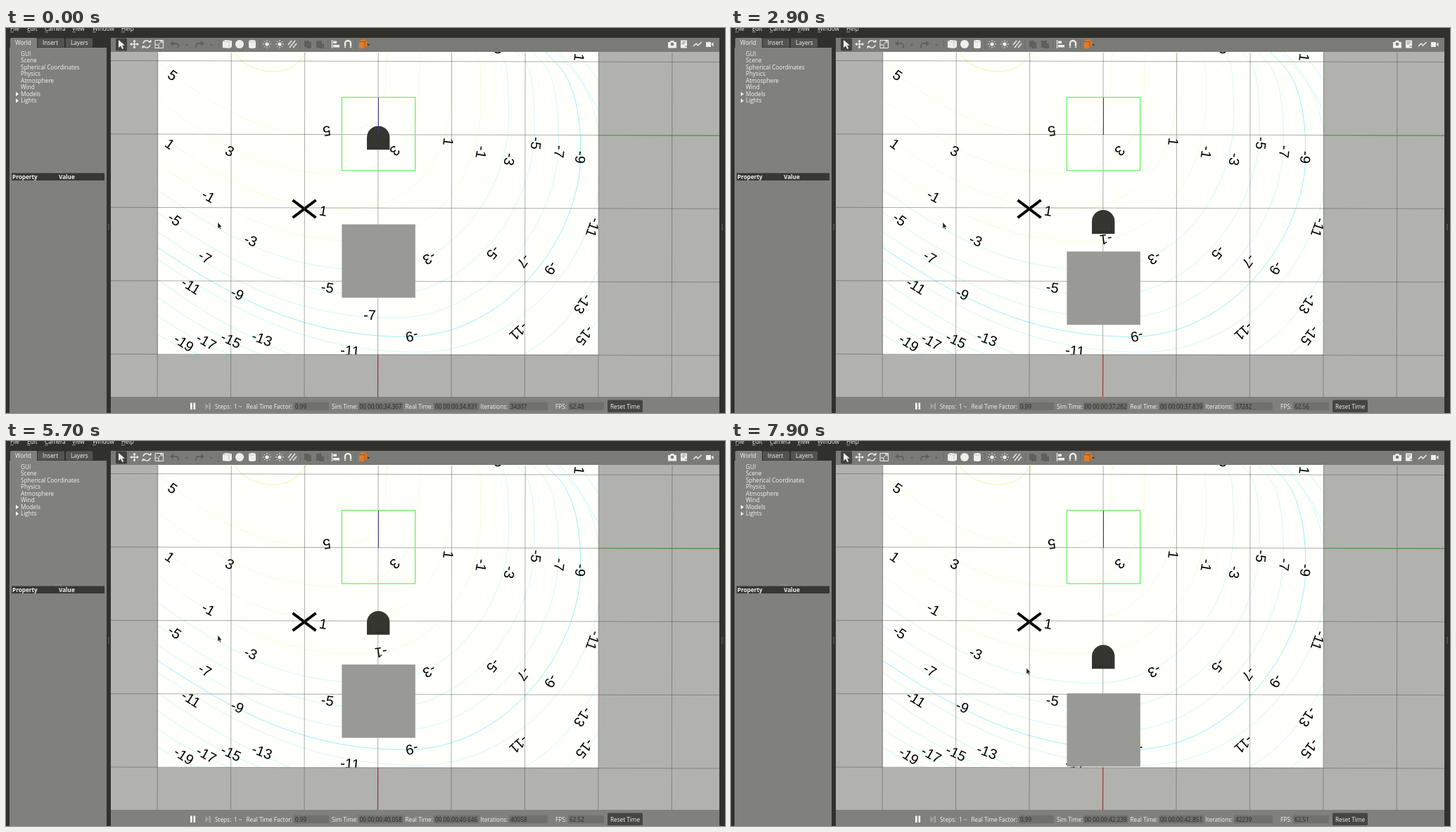
Recreate the animation shown at these times as an HTML page. Size 1022x548 px, loop 8 s.

```html
<!DOCTYPE html>
<html lang="en">
<head>
<meta charset="utf-8">
<title>Robot pushing a block</title>
<style>
html, body { margin: 0; width: 100%; height: 100%; overflow: hidden; background: #30302c; }
svg { display: block; width: 1022px; height: 548px; font: 8.2px "Open Sans", "Noto Sans", sans-serif; }
text { fill: #f2f2f0; white-space: pre; }
.label text { font: 20px "Liberation Sans", Arial, sans-serif; fill: #000; text-anchor: middle; }
.value { fill: #282825; }
</style>
</head>
<body>
<svg id="stage" viewBox="0 0 1022 548"></svg>
<script>
const rect = (x, y, w, h, fill, extra = '') =>
  `<rect x="${x}" y="${y}" width="${w}" height="${h}" fill="${fill}" ${extra}/>`;
const line = (d, stroke, width = 1, extra = '') =>
  `<path d="${d}" fill="none" stroke="${stroke}" stroke-width="${width}" ${extra}/>`;
const shape = (d, fill, extra = '') => `<path d="${d}" fill="${fill}" ${extra}/>`;
const text = (x, y, s, extra = '') => `<text x="${x}" y="${y}" ${extra}>${s}</text>`;
const each = (list, f) => list.map(f).join('');
const repeat = (n, f) => each([...Array(n).keys()], f);

const yellow = '#f4f09a', cyan = '#7ff0f4';

// Height line k: from the left edge through its lowest and rightmost points to the top.
function contour(k) {
  const left = 48 + 56 * k - 2.6 * k * k;
  const bx = 450 + 17 * k, by = 151 + 58 * k - 2.4 * k * k;
  const rx = 540 + 49 * k - 1.35 * k * k, ry = 60 + 17 * k;
  const top = rx - k * k, w = bx - 216;
  return line(`M216 ${left}C${216 + w * .32} ${left + (by - left) * .6} ${bx - w * .4} ${by} ${bx} ${by}` +
    `S${rx} ${ry + (by - ry) * .46} ${rx} ${ry}S${top + 8} 50 ${top} 34`,
    k < 4 ? yellow : cyan, 1, `opacity="${k === 7 ? .8 : .35}"`);
}
const cornerLine = d => line(d, cyan, 1, 'opacity=".4"');
const corners =
  repeat(4, i => cornerLine(`M216 ${358 + 26 * i}Q${300 - 18 * i} ${422 + 11 * i} ${405 - 43 * i} 465`)) +
  repeat(2, i => cornerLine(`M${735 + 60 * i} 465Q${800 + 20 * i} ${430 + 18 * i} 842 ${345 + 70 * i}`)) +
  repeat(2, i => cornerLine(`M${786 + 26 * i} 34Q${815 + 12 * i} ${62 - 10 * i} 842 ${118 - 44 * i}`));

// Labels follow the slope of the height lines; those on the right half stand on their heads.
const uprightLabels = `5 237 67|1 233 165|3 318 175|-1 288 239|-5 240 272|-3 348 302|-7 283 326|-11 263 367
|-9 329 378|-19 253 448|-17 285 446|-15 320 444|-13 364 442|-11 489 459|-7 517 408|-5 457 369|1 451 260`;
const turnedLabels = `5 456 147|3 553 175|1 629 162|-1 676 177|-3 716 187|-5 754 164|-7 787 176|-9 817 184
|1 815 42|-9 577 439|-3 602 328|-5 693 320|-7 736 332|-9 775 342|-11 835 284|-13 820 393|-15 823 438
|-11 729 432|-1 533 301`;
const uprightAngle = x => (530 - x) * .12;
const turnedAngle = (x, y) =>
  90 + Math.min(82, Math.max(7, Math.atan2(y - 145, 1.3 * (x - 530)) * 180 / Math.PI));
const labels = (list, angle) => each(list.split('|'), item => {
  const [s, x, y] = item.trim().split(' ');
  return `<text transform="translate(${x} ${y}) rotate(${angle(+x, +y)})" dy=".36em">${s}</text>`;
});

const gridLines = repeat(8, i => `M${215.8 + 104.45 * i} 35l-.7 490`) +
  repeat(5, i => `M149 ${46.5 + 104.4 * i}l865 2`);

const scene = `<g clip-path="url(#view)">
  ${rect(149, 34, 865, 491, '#b1b1ad')}
  ${rect(216, 34, 626, 430.7, '#fffffc')}
  <g clip-path="url(#plane)">
    ${repeat(9, contour)}
    ${corners}
    ${line('M325 34C332 49 355 62 380 62S418 49 426 34', yellow, 1, 'opacity=".9"')}
    <g class="label">${labels(uprightLabels, uprightAngle)}${labels(turnedLabels, turnedAngle)}</g>
    ${line('M695 34Q699 37 703 34', '#000', 1.6)}
    ${line('M407.5 245L440.5 270M440.5 245L407.5 270', '#000', 4)}
  </g>
  ${line(gridLines, '#4a4a46', 1, 'opacity=".45"')}
  ${line('M842 152.7L1014 153.2', '#45a345', 1.1)}
  ${line('M528.7 465L528.5 525', '#8e3b3b', 1.2)}
  <g id="robot">
    ${shape('M513 33.3V15.6A16.2 16.2 0 0 1 545.4 15.6V33.3Z', '#363631')}
    ${line('M517 17V30H541V17M524 29.5H535', '#2c2c28', .7)}
  </g>
  ${rect(477.4, 0, 104.4, 104.3, '#999995', 'id="block"')}
  ${line('M529.5 99V152', '#3c3c84')}
  ${rect(477.4, 98.6, 104.2, 104.4, 'none', 'stroke="#62ee62" stroke-width="1.2"')}
  <path id="cursor" d="M0 0V9L2 7.2L3.4 10.2L4.7 9.6L3.4 6.7H6Z" fill="#22221f" stroke="#eee" stroke-width=".5"/>
</g>`;

const menu = each([['File', 6], ['Edit', 30], ['Camera', 55], ['View', 94], ['Window', 123], ['Help', 164]],
  ([s, x]) => text(x, 4, s) + line(`M${x} 5.7h5`, '#ddd', .6));

const tree = ['GUI', 'Scene', 'Spherical Coordinates', 'Physics', 'Atmosphere', 'Wind', 'Models', 'Lights'];
const panel = rect(5, 28, 138, 520, '#80807d') +
  rect(6, 14, 38, 15, '#80807d', 'rx="1.5"') +
  repeat(2, i => rect(45 + 40 * i, 14.5, 38, 13, '#53534f', 'rx="1.5"')) +
  text(13, 24.3, 'World') + text(52, 24.3, 'Insert') + text(92, 24.3, 'Layers') +
  each(tree, (s, i) => text(21, 40 + i * 9.43, s)) +
  repeat(2, i => shape(`M14 ${91 + 9.4 * i}l4 3-4 3Z`, '#fff')) +
  line('M70 205H80', '#a5a5a1', 1, 'stroke-dasharray="1 1"') +
  rect(8, 206.5, 132, 10.5, '#373733') +
  text(9, 215, 'Property', 'font-weight="700"') + text(75, 215, 'Value', 'font-weight="700"') +
  line('M146 279V289M1018 279V289', '#77776f', 1.6, 'stroke-dasharray="1 1"');

const dim = '#5f5f5b', ink = '#efefec', bar = '#7a7a76', shade = '#b9b9b5';
const at = (x, content) => `<g transform="translate(${x} 23)">${content}</g>`;
const dot = (r, fill) => `<circle r="${r}" fill="${fill}"/>`;
const turn = (n, content) => repeat(n, i => `<g transform="rotate(${360 / n * i})">${content}</g>`);
const dropdown = (x, fill) => at(x, shape('M-2 0h4l-2 2.5Z', fill));
const sun = dot(2.6, ink) + turn(8, line('M4 0H6', ink, .9));
const undo = line('M-4 -1H1Q6 -1 5 5', dim, 1.8) + shape('M-7 -1l5-4v8Z', dim);
const icons =
  at(164, rect(-8, -8.5, 16, 18, '#41413d', 'rx="1.5"') + shape('M-4 -6V5L-1 2.5L1.2 7L3.2 6L1 1.7H5Z', ink)) +
  at(182.5, turn(4, line('M0 0H5', ink, 1.4) + shape('M6.5 0l-3-2.2v4.4Z', ink))) +
  at(200, turn(2, line('M-5 -1A5 5 0 0 1 4 -3', ink, 1.4) + shape('M2 -2.5h4.500v-4Z', ink))) +
  at(218, line('M-6 -5.5H5.5V5.5H-6ZM-6 1H-1V5.5M-1 0L4 -4.3M1 -4.3H4V-1.500', ink)) +
  at(240, undo) + at(275, `<g transform="scale(-1 1)">${undo}</g>`) +
  dropdown(257, dim) + dropdown(292, dim) +
  each([302.5, 361, 418, 457.5, 496.5], x => line(`M${x} 17V30`, '#6a6a66')) +
  at(314, shape('M-6 -4l4-2 9 1v9l-4 2-9-1Z', ink) + line('M-6 -4l9 1.2v8.8M3 -2.8l4-2', shade, .7)) +
  at(332, dot(6, ink)) +
  at(350, shape('M-5 -4Q-5 -6 0 -6T5 -4V4Q5 6 0 6T-5 4Z', ink) + line('M-5 -4Q0 -1 5 -4', shade, .7)) +
  at(371, sun) + at(389, sun) +
  at(407, line('M-6 1L-1 -5M-4 5L4 -5M1 5L6 -1', ink, 1.3)) +
  at(429, shape('M-5 -5h7v9h-7ZM-2 -3h7v9h-7Z', dim)) + at(447, shape('M-6 -5h8v10h-8ZM-2 -1h7v7h-7Z', dim)) +
  at(468, line('M-4.5 -6V6', ink, 1.2) + rect(-3, -4.5, 5, 3.5, ink) + rect(-3, 1, 9, 3.5, ink)) +
  at(486, line('M-4 5V-1A4 4 0 0 1 4 -1V5', ink, 2.3) + line('M-6 3.3H6', bar, .8)) +
  at(508, shape('M-6 -4l3-2.5h8v9l-3 3.5h-8Z', '#e07b28') + line('M-6 -3.5h8v9M2 -3.5l3-3', '#6a4020', .7)) +
  dropdown(515, '#333') +
  at(947, shape('M-6 -3h3l1-2h4l1 2h3v8.5h-12Z', ink) + dot(2.3, bar)) +
  at(964, rect(-5, -5.5, 9, 11, ink) + line('M-3.5 -3h6M-3.5 -.5h4M1 3h3', bar)) +
  at(982, line('M-5 3l4-4 2.5 3 5-5', ink, 1.5)) +
  at(1000, rect(-5, -3, 7, 7, ink) + shape('M2.500 0l3-2.5v6Z', ink));
const toolbar = rect(149, 14, 865, 20, bar) + icons;

const field = (x, w, id) => rect(x, 532.8, w, 11.4, '#70706c', 'rx="1"') + text(x + 2, 541.7, '', `id="${id}" class="value"`);
const status = rect(149, 525, 865, 23, '#80807c') +
  rect(262, 533.5, 2.6, 9.5, '#fff') + rect(266.5, 533.5, 2.6, 9.5, '#fff') +
  shape('M283.5 534l4.5 4.5-4.5 4.5ZM288.5 534h2.5v9h-2.5Z', '#a4a4a0') +
  text(297, 541.5, 'Steps:') + text(324, 541.5, '1') + line('M331 538l2 2 2-2', '#ddd', .8) +
  text(341.5, 541.7, 'Real Time Factor:') + field(409, 50, 'factor') +
  text(463, 541.7, 'Sim Time:') + field(500.5, 64, 'sim') +
  text(567.5, 541.7, 'Real Time:') + field(608, 64, 'real') +
  text(674.5, 541.7, 'Iterations:') + field(715, 55, 'iterations') +
  text(781, 541.7, 'FPS:') + field(799, 51, 'fps') +
  rect(855, 529.5, 50, 17.5, '#454541', 'rx="1.5"') + text(859, 541.5, 'Reset Time');

document.getElementById('stage').innerHTML = `<defs>
  <clipPath id="view">${rect(149, 34, 865, 491, '#000')}</clipPath>
  <clipPath id="plane">${rect(216, 34, 626, 430.7, '#000')}</clipPath></defs>
  ${rect(0, 0, 1022, 548, '#30302c')}${menu}${panel}${toolbar}${scene}${status}`;

// Turning points of the robot: [time, y].
const robotKeys = [[0, 140], [150, 140], [1400, 244], [1800, 272], [2250, 285], [2500, 285],
  [4200, 177], [4680, 177], [7000, 326], [7350, 326], [8000, 284.5]];

function robotAt(t) {
  const next = robotKeys.findIndex(k => k[0] > t);
  const [t0, a] = robotKeys[next - 1], [t1, b] = robotKeys[next];
  return a + (b - a) * (t - t0) / (t1 - t0);
}
const clock = ms => `00 00:00:${(Math.round(ms) / 1000).toFixed(3)}`;
const node = id => document.getElementById(id);
const move = (id, x, y) => node(id).setAttribute('transform', `translate(${x} ${y})`);
const show = (id, value) => { node(id).textContent = value; };

function draw(t) {
  const robot = robotAt(t);
  const reached = robotKeys.filter(k => k[0] <= t).map(k => k[1]);
  move('robot', 0, robot);
  move('block', 0, Math.max(279.5, Math.max(robot, ...reached) + 33.2)); // pushed, never pulled

  const p = Math.min(1, Math.max(0, (t - 7200) / 600)), ease = p * p * (3 - 2 * p);
  move('cursor', 301 + 119 * ease, 276.5 + 46.5 * ease);

  // The clocks skip a tenth of a second once.
  const time = t + (t < 1800 ? 0 : 100), sim = 34307 + time * .9915;
  show('sim', clock(sim));
  show('real', clock(34831 + time * 1.0025));
  show('iterations', Math.round(sim));
  show('factor', t >= 400 && t < 2400 ? '1.00' : '0.99');
  const fpsPeak = t < 1300 ? 0 : .23 * Math.exp(-.75 * Math.floor((t - 1300) / 800));
  show('fps', (t < 1300 ? 62.48 : 62.51 + fpsPeak).toFixed(2));
}

const start = performance.now();
function tick() {
  const elapsed = (performance.now() - start) % 8000;
  draw(Math.floor(elapsed / 100) * 100);
  requestAnimationFrame(tick);
}
tick();
</script>
</body>
</html>
```
